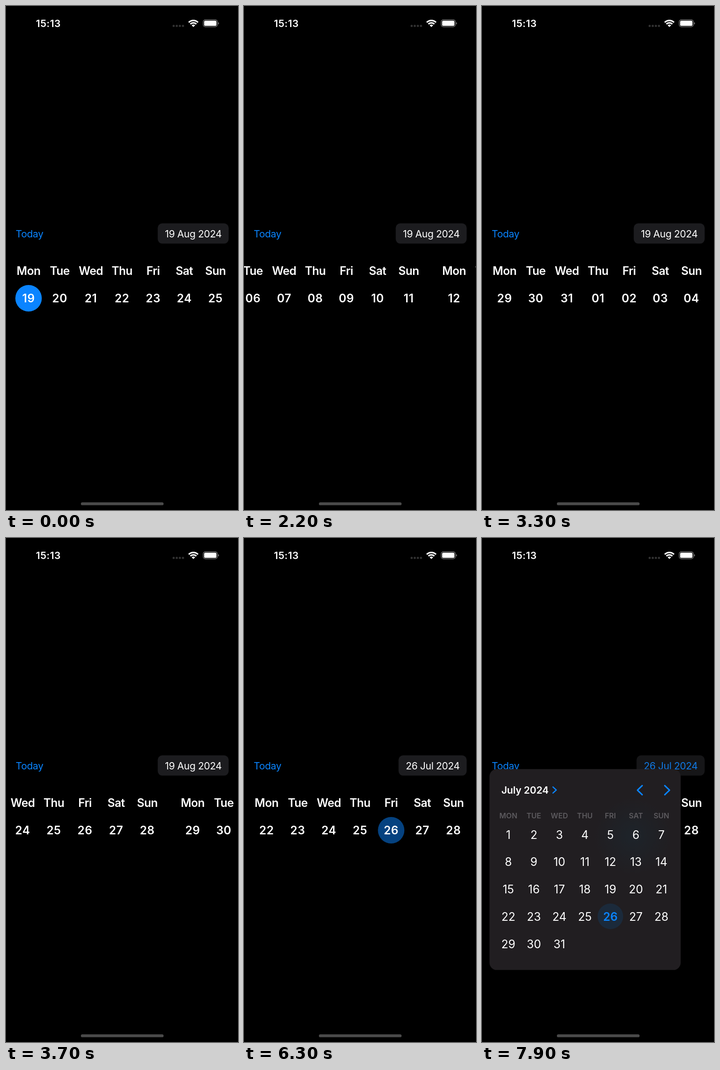
An HTML page with a canvas for the animation above (8000 ms loop, 508 by 1102 pixels).

```html
<!DOCTYPE html>
<html lang="en">
<head>
<meta charset="utf-8">
<title>Week picker</title>
<style>
  html, body { margin: 0; width: 100%; height: 100%; overflow: hidden; background: #000; }
  canvas { display: block; }
</style>
</head>
<body>
<canvas id="stage" width="508" height="1102"></canvas>
<script>
const ctx = document.getElementById('stage').getContext('2d');
const LOOP = 8000, STEP = 100, PAGE = 508.6;
const BLUE = '#0a84ff', WHITE = '#fff';
const DAYS = ['Mon', 'Tue', 'Wed', 'Thu', 'Fri', 'Sat', 'Sun'];
const MONTHS = { 6: 'Jul', 7: 'Aug' };

// Swipes: time of the first movement and how long the finger drags before release
const SWIPES = [[1400, 0], [2100, 0], [2900, 0], [3500, 135]];
// Selections: time and day offset from today
const SELECTIONS = [[0, 0], [4900, -28], [5600, -26], [6300, -24]];
const POPOVER_AT = 7300;

const dateAt = offset => new Date(Date.UTC(2024, 7, 19 + offset));
const twoDigits = date => String(date.getUTCDate()).padStart(2, '0');

function setFont(size, weight, spacing) {
  ctx.font = `${weight} ${size}px Inter, sans-serif`;
  ctx.letterSpacing = spacing + 'px';
}

function text(str, x, y, { size = 21.5, weight = 400, color = WHITE, align = 'center', spacing = -0.35 } = {}) {
  setFont(size, weight, spacing);
  ctx.textAlign = align;
  ctx.fillStyle = color;
  ctx.fillText(str, x, y + size * 0.363);
}

function box(x, y, w, h, r, color) {
  ctx.fillStyle = color;
  ctx.beginPath();
  ctx.roundRect(x, y, w, h, r);
  ctx.fill();
}

function disc(x, y, r, color) {
  ctx.fillStyle = color;
  ctx.beginPath();
  ctx.arc(x, y, r, 0, 2 * Math.PI);
  ctx.fill();
}

function chevron(x, y, dx, dy, width) {
  ctx.strokeStyle = BLUE;
  ctx.lineWidth = width;
  ctx.lineCap = ctx.lineJoin = 'round';
  ctx.beginPath();
  ctx.moveTo(x - dx, y - dy);
  ctx.lineTo(x + dx, y);
  ctx.lineTo(x - dx, y + dy);
  ctx.stroke();
}

// Linear drag, then exponential settling onto the next page
function swipeProgress(t, [start, drag]) {
  if (t < start) return 0;
  const s = (t - start - drag) / 100;
  if (s < 0) return Math.max(0, 0.358 * (1 + s / 1.5));
  return s > 3.5 ? 1 : 1 - 0.642 * 0.3 ** s;
}

function drawStatusBar() {
  text('15:13', 92.8, 38.3, { weight: 600, spacing: 0.5 });
  for (let i = 0; i < 4; i++) box(364.8 + i * 6.8, 41.2, 4.6, 4.6, 1.5, '#333');

  ctx.strokeStyle = ctx.fillStyle = WHITE;
  ctx.lineCap = 'butt';
  ctx.lineWidth = 3.3;
  for (const r of [14.4, 9.2]) {
    ctx.beginPath();
    ctx.arc(410.3, 46, r, -Math.PI * 0.75, -Math.PI * 0.25);
    ctx.stroke();
  }
  ctx.beginPath();
  ctx.moveTo(410.3, 46);
  ctx.arc(410.3, 46, 5.4, -Math.PI * 0.75, -Math.PI * 0.25);
  ctx.fill();

  ctx.strokeStyle = '#7a7a7a';
  ctx.lineWidth = 1.3;
  ctx.beginPath();
  ctx.roundRect(431.7, 30, 31.2, 15.6, 5);
  ctx.stroke();
  box(433.8, 32, 27, 11.6, 3.2, WHITE);
  box(464.4, 35.4, 1.8, 5, [0, 2, 2, 0], '#7a7a7a');
}

function drawWeek(week, left, selected) {
  DAYS.forEach((day, i) => {
    const x = left + 254 + (i - 3) * 68.2;
    const offset = i - week * 7;
    if (offset === selected) disc(x, 639, 29, offset === 0 ? BLUE : '#054280');
    text(day, x, 578.5, { size: 25, weight: 600, spacing: -0.5 });
    text(twoDigits(dateAt(offset)), x, 639, { size: 25, weight: 600, spacing: 0.5 });
  });
}

function drawHeader(selected, open) {
  text('Today', 21.3, 498, { color: BLUE, align: 'left' });
  const date = dateAt(selected);
  const label = `${twoDigits(date)} ${MONTHS[date.getUTCMonth()]} 2024`;
  setFont(21.5, 400, -0.35);
  const width = ctx.measureText(label).width + 31;
  const left = 487.6 - width;
  box(left, 475.2, width, 44.4, 10, open ? '#161618' : '#1c1c1f');
  text(label, left + 15.8, 498, { color: open ? '#1079e4' : WHITE, align: 'left' });
}

function drawPopover(t, selected) {
  const grow = t >= 7900 ? 1 : 1 - Math.exp((POPOVER_AT - t) / 90);
  const scale = 0.2 + 0.8 * grow;
  ctx.save();
  ctx.globalAlpha = grow;
  ctx.translate(413, 505);
  ctx.scale(scale, scale);
  ctx.translate(-413, -505);
  box(16.4, 505.2, 418.6, 439.4, 16, '#211e21');

  // The selected day shows faintly through the panel
  const glow = ctx.createRadialGradient(330, 652, 0, 330, 652, 85);
  glow.addColorStop(0, 'rgba(28, 38, 46, 0.7)');
  glow.addColorStop(1, 'rgba(28, 38, 46, 0)');
  disc(330, 652, 85, glow);

  text('July 2024', 42.5, 551.5, { weight: 600, align: 'left', spacing: -0.1 });
  chevron(159, 551, 3.6, 6.6, 2.6);
  chevron(345.6, 551.3, -5.2, 10, 3.1);
  chevron(405.4, 551.3, 5.2, 10, 3.1);

  const columnX = i => 57.7 + i * 55.85;
  DAYS.forEach((day, i) =>
    text(day.toUpperCase(), columnX(i), 607, { size: 16, weight: 600, color: '#5c5a5e', spacing: 0 }));

  const current = dateAt(selected).getUTCDate();
  for (let d = 1; d <= 31; d++) {
    const x = columnX((d - 1) % 7), y = 648.5 + Math.floor((d - 1) / 7) * 59.75;
    const chosen = d === current;
    if (chosen) disc(x, y - 0.5, 28, '#1b2a3b');
    text(d, x, y, { size: 25, weight: chosen ? 600 : 400, color: chosen ? BLUE : WHITE, spacing: 0 });
  }
  ctx.restore();
}

function draw(now) {
  // The screen refreshes ten times a second
  const t = Math.floor(now % LOOP / STEP) * STEP;
  const position = SWIPES.reduce((sum, swipe) => sum + swipeProgress(t, swipe), 0);
  const selected = SELECTIONS.filter(([start]) => t >= start).pop()[1];
  const open = t >= POPOVER_AT;

  ctx.fillStyle = '#000';
  ctx.fillRect(0, 0, 508, 1102);
  drawStatusBar();
  drawHeader(selected, open);
  const first = Math.floor(position);
  for (const week of [first, first + 1]) drawWeek(week, (position - week) * PAGE, selected);
  if (open) drawPopover(t, selected);
  box(164, 1085.2, 181, 6.4, 3.2, '#4b4b4b');
}

let begin;
function tick(now) {
  begin ??= now;
  draw(now - begin);
  requestAnimationFrame(tick);
}
requestAnimationFrame(tick);
</script>
</body>
</html>
```
